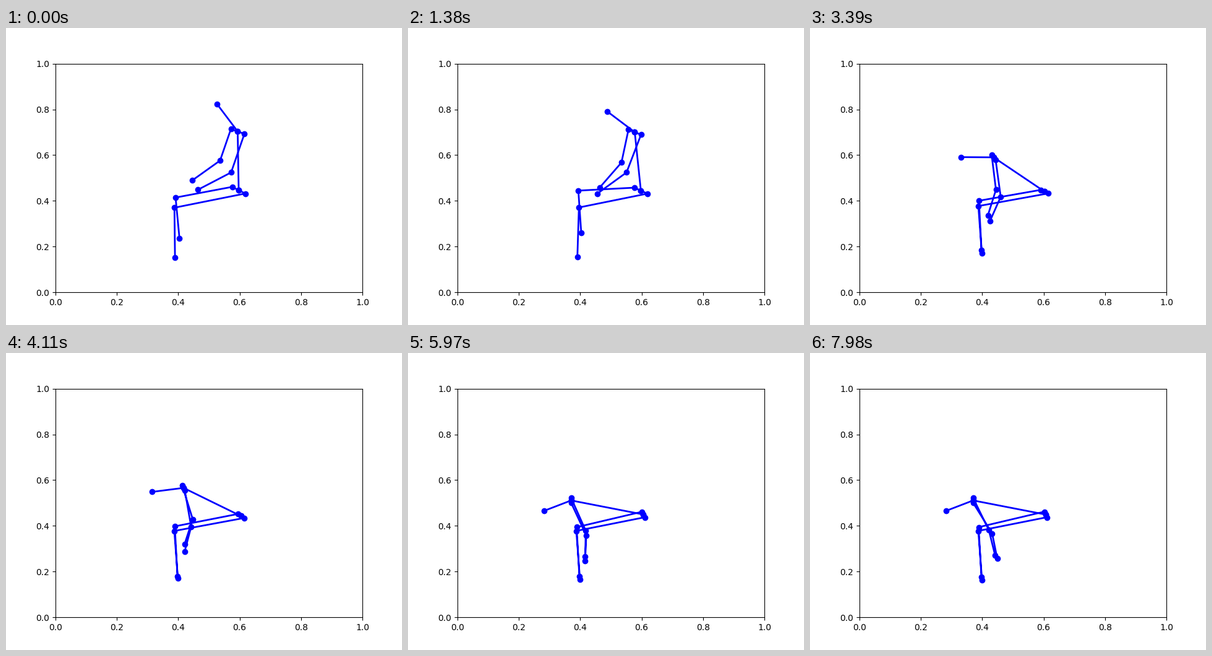
Write a matplotlib script that moves like this. It is 640x480 px and loops after 8000 ms.

```python
import numpy as np
import matplotlib.pyplot as plt
from matplotlib.animation import FuncAnimation

FRAMES, STEP = 250, 32  # 8 s loop
NOW = np.arange(FRAMES) * STEP

# Bone angles in degrees from the vertical at a few key times (ms).
KEY_T = np.array([0, 1380, 2280, 3390, 4860, 5970, 7980])
TORSO = [1, 6, 28, 56.5, 70, 79, 79]
HEAD = [37, 53, 71, 90, 103.5, 111, 111]
UPPER_L = [-19, -12, 12, 7, 29, 24, 26]
FORE_L = [-54.5, -41, -29, -17.5, -19, -1, 14]
UPPER_R = [-19, -21, -6, 8, 12, 25, 32]
FORE_R = [-62.5, -54, -36.5, -23.5, -7, -2.5, 11.5]


def ease(keys):
    """Angle in every frame, smooth through the keys and without overshoot."""
    v = np.array(keys, float)
    d = np.diff(v) / np.diff(KEY_T)
    m = np.concatenate([d[:1], np.zeros(len(d) - 1), d[-1:]])
    for i, (a, b) in enumerate(zip(d, d[1:]), 1):
        if a * b > 0:
            m[i] = 2 * a * b / (a + b)
    i = np.searchsorted(KEY_T, NOW, side="right") - 1
    i = np.minimum(i, len(d) - 1)
    h = KEY_T[i + 1] - KEY_T[i]
    u = (NOW - KEY_T[i]) / h
    return ((1 + 2 * u) * (1 - u) ** 2 * v[i] + u * (1 - u) ** 2 * h * m[i]
            + u * u * (3 - 2 * u) * v[i + 1] + u * u * (u - 1) * h * m[i + 1])


def bone(keys, length):
    """Vector x + iy in pixels; a positive length hangs down."""
    a = np.radians(ease(keys))
    return length * (np.sin(a) + 1j * np.cos(a))


bend = ease(TORSO) / 79                      # 0 upright, 1 folded
settle = 1 - (1 - bend) ** 2
sway = np.sin(np.pi * bend)                  # peaks halfway through the bend
lift = np.exp(-((NOW - 1600) / 900) ** 2)    # one foot rises briefly

pelvis = 376 + 4.5 * bend + 1j * (262 - bend + 4 * sway)
hip_gap = 10.5 - 8.5 * bend ** 2 + 1j * (5.5 - bend - 2.5 * sway)
hip_l, hip_r = pelvis - hip_gap, pelvis + hip_gap

neck = pelvis + bone(TORSO, -(95 + 24 * bend ** 5))
head = neck + bone(HEAD, -(55.5 - 8.5 * bend ** 3))
shoulder_gap = 11 * (1 - bend) + 4j
shoulder_l, shoulder_r = neck - shoulder_gap, neck + shoulder_gap

elbow_l = shoulder_l + bone(UPPER_L, 54 + 4 * bend)
wrist_l = elbow_l + bone(FORE_L, 55 - 13 * settle)
elbow_r = shoulder_r + bone(UPPER_R, 66 - 8 * bend)
wrist_r = elbow_r + bone(FORE_R, 61 - 20 * settle)

knee_l = 274 - 1.5 * bend + 1.5 * lift + 1j * (274.5 + 7 * bend - 13 * lift)
ankle_l = 280.5 - 3.5 * settle + 1j * (340.5 + 21 * settle - 13 * lift)
knee_r = 272 + 4.5 * lift + 1j * (290.5 - 3 * settle)
ankle_r = 273 + 5 * settle + 1j * (371.5 - 5 * settle - 4 * sway)

CHAINS = [
    (head, neck, pelvis),
    (wrist_l, elbow_l, shoulder_l, neck, shoulder_r, elbow_r, wrist_r),
    (ankle_l, knee_l, hip_l, pelvis, hip_r, knee_r, ankle_r),
]

fig, ax = plt.subplots(figsize=(6.4, 4.8), dpi=100)
ax.set_xlim(0, 1)
ax.set_ylim(0, 1)
lines = [ax.plot([], [], "o-", color="blue", lw=2)[0] for _ in CHAINS]


def draw(n):
    for line, chain in zip(lines, CHAINS):
        p = np.array([joint[n] for joint in chain])
        line.set_data((p.real - 80) / 496, (427.2 - p.imag) / 369.6)
    return lines


anim = FuncAnimation(fig, draw, frames=FRAMES, interval=STEP,
                     init_func=lambda: draw(0), repeat=True, repeat_delay=0)
plt.show()
```
